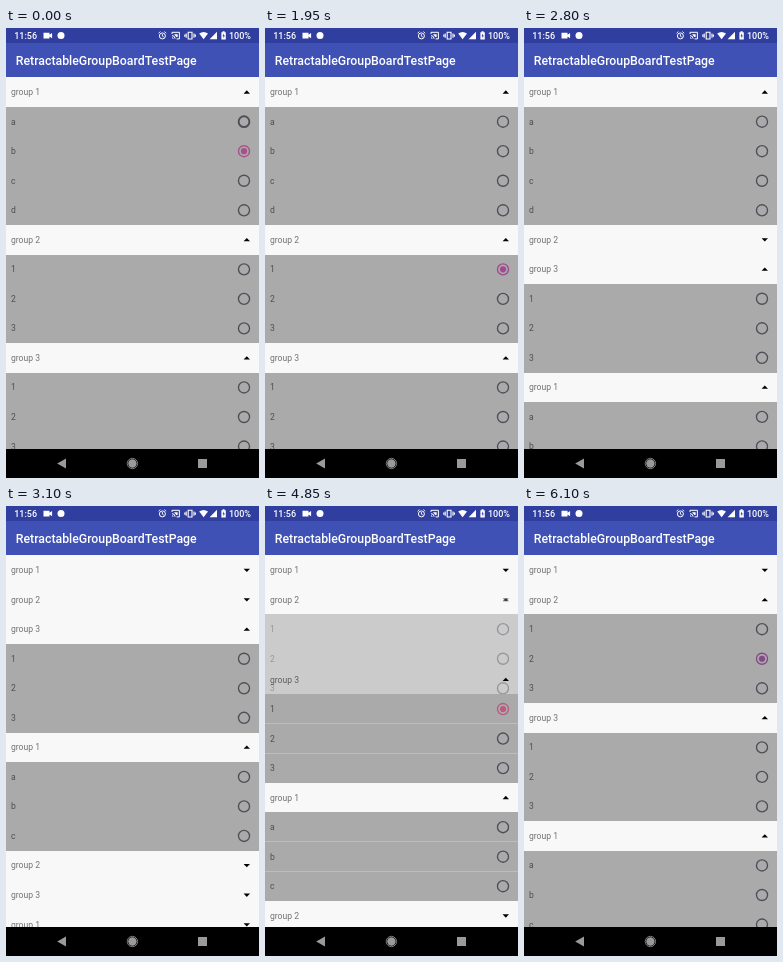
Write an HTML page that moves like this. It is 253 px wide and 450 px high and loops after 6.15 s.

```html
<!DOCTYPE html>
<html lang="en">
<head>
<meta charset="utf-8">
<title>Expanding list</title>
<style>
  html, body { margin: 0; width: 100%; height: 100%; overflow: hidden; background: #f8f8f8; }
  svg { display: block; width: 253px; height: 450px; font-family: Roboto, sans-serif; }
  rect { shape-rendering: crispEdges; }
  .row { font-size: 8.6px; fill: rgba(0, 0, 0, .54); }
  .seam { fill: #f8f8f8; opacity: .25; }
  .bar { fill: #fff; font-weight: 500; }
  .line { fill: none; stroke: #fff; }
</style>
</head>
<body>
<svg viewBox="0 0 253 450">
  <rect width="253" height="450" fill="#f8f8f8"/>
  <g id="list"></g>

  <rect y="15" width="253" height="34" fill="#3f51b5"/>
  <rect width="253" height="15" fill="#303f9f"/>
  <text class="bar" x="9.8" y="36.8" font-size="12.3">RetractableGroupBoardTestPage</text>

  <g class="bar">
    <text x="8.2" y="10.9" font-size="9">11:56</text>
    <text x="223" y="10.9" font-size="9">100%</text>
    <path d="M37.5 4.8h6v2l2.6-1.8v5.2l-2.6-1.8v2h-6z"/>
    <circle cx="55" cy="7.5" r="3.5"/>
    <!-- alarm, cast, vibrate -->
    <g class="line">
      <circle cx="156.4" cy="7.9" r="3"/>
      <path d="M156.4 6v2.2l1.4 .8M152.6 5.2l1.8-1.6M160.2 5.2l-1.8-1.6" stroke-width=".9"/>
      <path d="M166 6V4.3h7.4v6.6h-2.8M166 7.6a3.2 3.2 0 0 1 3.1 3.1M166 9.6a1.2 1.2 0 0 1 1.1 1.1"/>
      <path d="M168 6.2h3.6v2.9h-1.2z" fill="#fff" stroke="none"/>
      <path d="M182.2 4.2h3.8v6.8h-3.8zM180.2 5.4v4.4M188 5.4v4.4M178.8 6.4v2.4M189.4 6.4v2.4" stroke-width="1.1"/>
    </g>
    <!-- wifi, signal, battery -->
    <path d="M193.2 5.6q4.4-3.2 8.8 0l-4.4 5.6z"/>
    <path d="M203.6 11.2h7.4V3.8z"/>
    <path d="M215.4 4.2h1.2v-.9h2v.9h1.2v7.2h-4.4z"/>
    <path d="M217.9 5.3l-1.4 2.9h1v2l1.4-2.8h-1z" fill="#303f9f"/>
  </g>

  <rect y="421" width="253" height="29"/>
  <g fill="#9a9a9a">
    <path d="M51.2 435.5l8.8-5v10z"/>
    <circle cx="126.4" cy="435.5" r="4.2"/>
    <circle cx="126.4" cy="435.5" r="5.2" fill="none" stroke="#9a9a9a" stroke-width=".8"/>
    <rect x="192" y="431" width="9" height="9"/>
  </g>
</svg>

<script>
const LOOP = 6150, ROW = 29.53, TOP = 49.4, DP = 0.615;
const DIM = '#504d58';
const PACE = 1.12;

// Radio poses: time, ring scale, ring stroke, dot scale
const CHECK = [[0, 1, 2, 0], [166, .5, 18, 0], [182, .9, 2, 1.4], [516, 1, 2, 1]];
const UNCHECK = [[0, 1, 2, 1], [182, .9, 2, 1.4], [198, .5, 18, 0], [532, 1, 2, 0]];

const clamp = x => Math.min(1, Math.max(0, x));
const ramp = (t, start, length) => .5 - .5 * Math.cos(Math.PI * clamp((t - start) / length));
const smooth = x => x * x * (3 - 2 * x);
const always = () => 1, never = () => 0;

// Each pick: when the radio goes on and off, and its colour
const groups = [
  { name: 'group 1', items: 'abcd', open: t => 1 - ramp(t, 2795, 305),
    picks: { a: [-5000, -540, '#a8508c'], b: [-540, 300, '#a8508c'] } },
  { name: 'group 2', items: '123', open: t => 1 - ramp(t, 1950, 370) + ramp(t, 4650, 370),
    picks: { 1: [300, 3700, '#a04a90'], 2: [5500, 9e9, '#85488a'] } },
  { name: 'group 3', items: '123', open: always, picks: { 1: [3700, 5500, '#b95d80'] } },
  { name: 'group 1', items: 'abc', open: always },
  { name: 'group 2', items: '', open: never },
  { name: 'group 3', items: '', open: never },
  { name: 'group 1', items: '', open: never }
];

function add(parent, tag, attrs, text) {
  const el = document.createElementNS('http://www.w3.org/2000/svg', tag);
  set(el, attrs);
  if (text) el.textContent = text;
  return parent.appendChild(el);
}

function set(el, attrs) {
  for (const key in attrs) el.setAttribute(key, attrs[key]);
}

function build(group) {
  const list = document.getElementById('list');
  const mid = ROW / 2;
  group.head = add(list, 'g', {});
  add(group.head, 'text', { class: 'row', x: 4.9, y: mid + 3 }, group.name);
  group.up = add(group.head, 'path', { d: `M237.6 ${mid + 1.5}h6.4l-3.2-3.3z` });
  group.down = add(group.head, 'path', { d: `M237.6 ${mid - 1.4}h6.4l-3.2 3.3z` });

  group.body = add(list, 'g', {});
  add(group.body, 'rect', { width: 253, height: ROW * group.items.length, fill: '#aaa' });
  group.seams = add(group.body, 'g', {});
  group.radios = [...group.items].map((label, i) => {
    const y = ROW * i + mid;
    if (i) add(group.seams, 'rect', { class: 'seam', y: ROW * i - .5, width: 253, height: 1 });
    add(group.body, 'text', { class: 'row', x: 4.9, y: y + 3 }, label);
    return {
      pick: group.picks && group.picks[label],
      ring: add(group.body, 'circle', { cx: 238, cy: y, fill: 'none' }),
      dot: add(group.body, 'circle', { cx: 238, cy: y })
    };
  });
}

function pose(keys, time) {
  let i = 1;
  while (i < keys.length - 1 && time > keys[i][0]) i++;
  const from = keys[i - 1], to = keys[i];
  const k = smooth(clamp((time - from[0]) / (to[0] - from[0])));
  return from.map((v, n) => v + (to[n] - v) * k);
}

function drawRadio({ pick, ring, dot }, t) {
  let color = DIM, state = [0, 1, 2, 0];
  if (pick && t >= pick[0]) {
    const on = t < pick[1];
    if (on) color = pick[2];
    state = pose(on ? CHECK : UNCHECK, (t - pick[on ? 0 : 1]) / PACE);
  }
  const [, scale, stroke, size] = state;
  set(ring, { r: 9 * DP * scale, 'stroke-width': stroke * DP * scale * 1.1, stroke: color });
  set(dot, { r: 5 * DP * size, fill: color });
}

function draw(t) {
  let y = TOP, shift = 0;
  for (const g of groups) {
    const open = g.open(t);
    set(g.head, { transform: `translate(0 ${y})` });
    set(g.up, { opacity: open });
    set(g.down, { opacity: 1 - open });
    y += ROW;
    set(g.body, { transform: `translate(0 ${y})`, opacity: open });
    set(g.seams, { opacity: shift });
    g.radios.forEach(radio => drawRadio(radio, t));
    y += ROW * g.items.length * open;
    // hairlines between rows show only while they slide
    shift = Math.max(shift, 4 * open * (1 - open));
  }
}

groups.forEach(build);
const start = performance.now();
function tick() {
  draw((performance.now() - start) % LOOP);
  requestAnimationFrame(tick);
}
tick();
</script>
</body>
</html>
```
